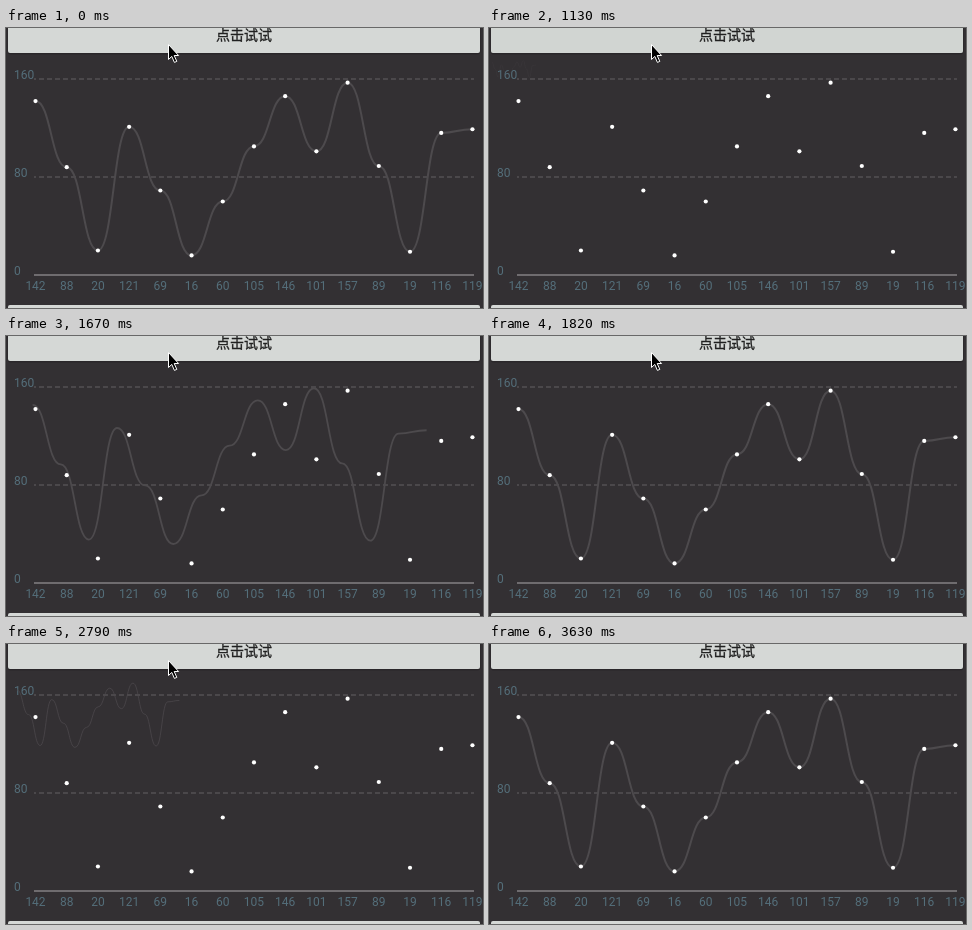
An HTML page for the animation above (4320 ms loop, 477 by 280 pixels).

```html
<!DOCTYPE html>
<html lang="zh">
<head>
<meta charset="utf-8">
<title>Line chart</title>
<style>
  html, body { margin: 0; width: 100%; height: 100%; overflow: hidden; background: #333033; }
  svg { display: block; }
  text { font: 12px Roboto, sans-serif; fill: #546e7a; }
  #days text { text-anchor: middle; }
  .button { fill: #d5d8d6; }
  .label { font: 14px "Noto Sans CJK SC", "Noto Sans CJK", sans-serif; fill: #212121; stroke: #212121; stroke-width: .3; text-anchor: middle; }
  .grid { stroke: #535053; stroke-width: 1.5; stroke-dasharray: 5 3; stroke-dashoffset: 3; }
  #curve { fill: none; stroke: #4d4a4d; stroke-width: 2; }
  #dots { fill: #fff; }
</style>
</head>
<body>
<svg width="477" height="280" viewBox="0 0 477 280">
  <clipPath id="clip"><rect x="2" y="-20" width="472" height="45" rx="2"/></clipPath>
  <rect x="1.5" y="-20" width="473" height="46.5" rx="3" fill="#2a272a"/>
  <rect class="button" x="2" y="-20" width="472" height="45" rx="2"/>
  <rect class="button" x="2" y="277" width="472" height="45" rx="2"/>
  <g id="ripple" clip-path="url(#clip)">
    <rect width="477" height="25" fill="#cfd0cf"/>
    <rect id="wave" height="25" fill="#c4c8c5"/>
  </g>
  <text class="label" x="238" y="11.5">点击试试</text>
  <g id="scale"></g>
  <path d="M28 247H468" stroke="#838183" stroke-width="1.6"/>
  <path id="curve"/>
  <g id="dots"></g>
  <g id="days"></g>
  <path id="cursor" d="M.5 .5V15.5L3.8 12.4L6.4 18.4L8.8 17.4L6.2 11.5H10.6Z" fill="#000" stroke="#fff" stroke-linejoin="round"/>
</svg>
<script>
const $ = id => document.getElementById(id);
const values = [142, 88, 20, 121, 69, 16, 60, 105, 146, 101, 157, 89, 19, 116, 119];
const px = i => 29.5 + i * 31.21;
const py = v => 247 - v * 1.225;

const LOOP = 4320, ORIGIN_Y = 30, PRESS_X = 163;
// the picture only refreshes on these beats after a click
const beats = [0, 120, 270, 420, 570, 690, 810, 960];
const clicks = [
  { start: 860, duration: 853, spread: .93 },
  { start: 2220, duration: 935, spread: .75 }
];

$('scale').innerHTML = [0, 80, 160].map(v =>
  `<text x="8" y="${py(v)}">${v}</text>` +
  (v ? `<path class="grid" d="M28 ${py(v)}H468"/>` : '')).join('');
$('dots').innerHTML = values.map((v, i) => `<circle cx="${px(i)}" cy="${py(v)}" r="2.1"/>`).join('');
$('days').innerHTML = values.map((v, i) => `<text x="${px(i)}" y="262">${v}</text>`).join('');
$('curve').setAttribute('d', values.map((v, i) => {
  const mid = px(i - .5);
  return i ? `C${mid} ${py(values[i - 1])} ${mid} ${py(v)} ${px(i)} ${py(v)}` : `M${px(0)} ${py(v)}`;
}).join(''));

function set(id, attributes) {
  for (const name in attributes) $(id).setAttribute(name, attributes[name]);
}

function draw(t) {
  const click = clicks.findLast(c => c.start <= t);
  const age = click ? beats.findLast(b => b <= t - click.start) : LOOP;

  // the curve grows from the corner, accelerating
  const s = click ? Math.min(1, (age / click.duration) ** 2) : 1;
  set('curve', {
    transform: `translate(0 ${ORIGIN_Y * (1 - s)}) scale(${s})`,
    visibility: s ? 'visible' : 'hidden'
  });

  // the ripple spreads from the pointer to both ends while it fades
  const spread = click ? Math.min(1, click.spread + age / 400) : 1;
  set('ripple', { opacity: Math.max(0, 1 - age / 350) });
  set('wave', { x: PRESS_X - 166 * spread, width: 482 * spread });

  set('cursor', {
    transform: t < 3480 ? 'translate(162 16)' : 'translate(267 211)',
    visibility: t < 3630 ? 'visible' : 'hidden'
  });
}

let start;
function loop(now) {
  start ??= now;
  draw((now - start) % LOOP);
  requestAnimationFrame(loop);
}
requestAnimationFrame(loop);
</script>
</body>
</html>
```
